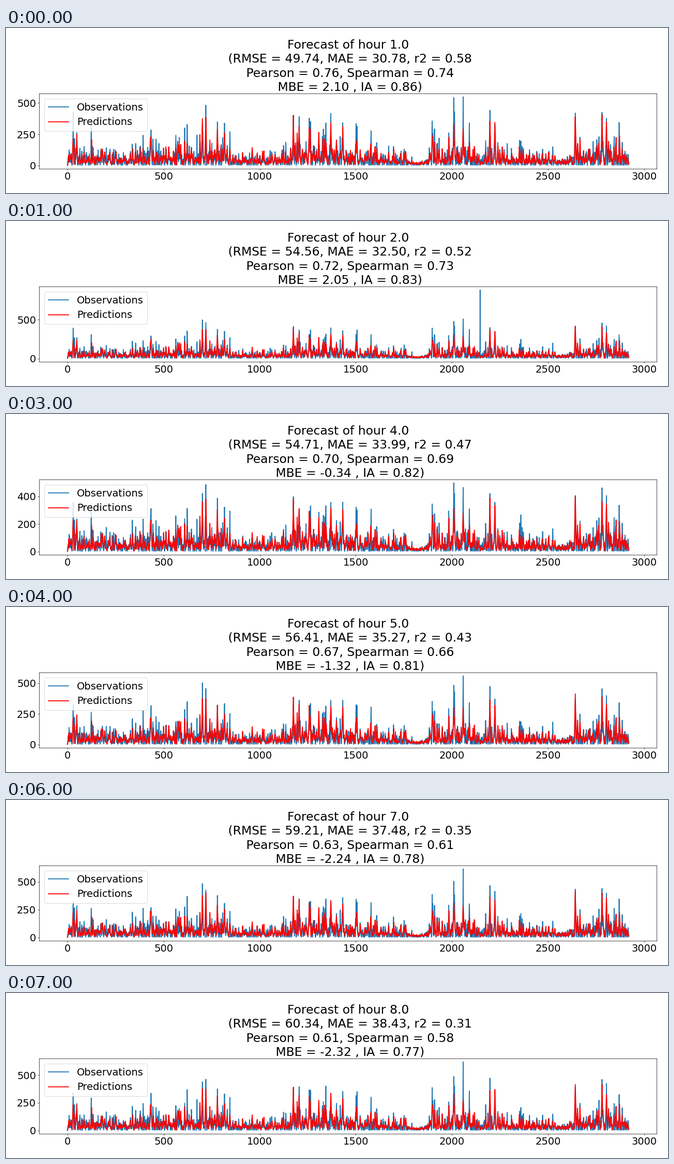
A matplotlib script for the animation above (8000 ms loop, 1280 by 320 pixels).

```python
import numpy as np
import matplotlib.pyplot as plt
from matplotlib.animation import FuncAnimation

W, H, DPI = 1280, 320, 64
LEFT, RIGHT, TOP, BOTTOM = 64.4, 1258.4, 127.0, 273.0
N = 2920
X = np.arange(N)
FLOOR = 2

plt.rcParams.update({"font.family": "DejaVu Sans", "font.size": 22})

# RMSE, MAE, r2, Pearson, Spearman, MBE, IA for each forecast hour
SCORES = [
    (49.74, 30.78, 0.58, 0.76, 0.74, 2.10, 0.86),
    (54.56, 32.50, 0.52, 0.72, 0.73, 2.05, 0.83),
    (54.53, 33.28, 0.49, 0.71, 0.71, 1.05, 0.83),
    (54.71, 33.99, 0.47, 0.70, 0.69, -0.34, 0.82),
    (56.41, 35.27, 0.43, 0.67, 0.66, -1.32, 0.81),
    (58.02, 36.52, 0.39, 0.65, 0.63, -2.13, 0.80),
    (59.21, 37.48, 0.35, 0.63, 0.61, -2.24, 0.78),
    (60.34, 38.43, 0.31, 0.61, 0.58, -2.32, 0.77),
]
# Position and height of the highest observation in each hour
RECORDS = [(2058, 548), (2146, 880), (2146, 610), (2009, 498),
           (2058, 560), (2058, 613), (2058, 615), (2058, 618)]

# Usual height of a burst along the series
ENVELOPE = [
    (0, 170), (80, 130), (330, 95), (440, 150), (700, 150), (910, 75),
    (1020, 110), (1120, 85), (1200, 165), (1450, 165), (1650, 75),
    (1740, 90), (1815, 22), (1850, 22), (1900, 140), (2070, 160),
    (2160, 70), (2310, 110), (2580, 55), (2680, 145), (2919, 140),
]
# Lasting peaks: position, forecast, observation
PEAKS = [
    (30, 225, 365), (435, 235, 300), (702, 375, 440), (720, 390, 447),
    (780, 300, 355), (817, 250, 340), (1175, 365, 367), (1205, 315, 375),
    (1258, 305, 330), (1370, 338, 350), (1432, 300, 350), (1900, 250, 280),
    (2009, 308, 480), (2058, 285, 490), (2197, 365, 435), (2223, 348, 350),
    (2641, 415, 415), (2780, 400, 445), (2803, 335, 400),
]


def bursts(xs, heights, half):
    """Upper hull of triangular peaks with the given half widths."""
    rise = np.clip(1 - np.abs(X[:, None] - xs) / half, 0, None)
    return (rise * heights).max(axis=1)


def daily(rng, low):
    """Daily cycle, eight samples a day, with a random height per day."""
    height = np.repeat(rng.uniform(low, 1, N // 8), 8)
    drift = np.cumsum(rng.normal(0, 0.15, N))
    return height * (0.5 - 0.5 * np.cos(2 * np.pi * X / 8 + drift))


rng = np.random.default_rng(12)
env = np.interp(X, *np.array(ENVELOPE).T)
peak_x, peak_pred, peak_obs = np.array(PEAKS).T

spots = np.arange(6, N, 12) + rng.integers(-5, 6, len(range(6, N, 12)))
strength = env[spots] * np.minimum(rng.lognormal(-0.15, 0.42, len(spots)), 1.6)
excess = np.minimum(rng.lognormal(0.1, 0.35, len(spots)), 1.9)

pred_base = np.maximum(0.5 * env * daily(rng, 0.2) + rng.uniform(5, 20, N),
                       bursts(spots, strength, rng.uniform(3, 7, len(spots))))
pred_base = np.maximum(pred_base, bursts(peak_x, peak_pred, 6))
obs_base = 0.75 * env * daily(rng, 0.2) * rng.lognormal(0, 0.3, N) + 3
obs_base = np.maximum(obs_base, bursts(spots + rng.integers(-2, 3, len(spots)),
                                       strength * excess, 3))
obs_base = np.maximum(obs_base, bursts(peak_x, peak_obs, 3))


def series(hour):
    rng = np.random.default_rng(hour)
    x, height = RECORDS[hour - 1]
    obs = np.clip(obs_base * rng.normal(1, 0.08, N), FLOOR, 0.99 * height)
    obs[x] = height
    pred = pred_base * rng.normal(1, 0.04, N) * np.clip(X / 8, 0, 1)
    return obs, np.clip(pred, FLOOR, 415)


def title(hour):
    rmse, mae, r2, pearson, spearman, mbe, ia = SCORES[hour - 1]
    return (f"Forecast of hour {hour:.1f}\n"
            f" (RMSE = {rmse:.2f}, MAE = {mae:.2f}, r2 = {r2:.2f}\n"
            f" Pearson = {pearson:.2f}, Spearman = {spearman:.2f}\n"
            f" MBE = {mbe:.2f} , IA = {ia:.2f})")


fig = plt.figure(figsize=(W / DPI, H / DPI), dpi=DPI, facecolor="white")
ax = fig.add_axes([LEFT / W, 1 - BOTTOM / H,
                   (RIGHT - LEFT) / W, (BOTTOM - TOP) / H])
obs_line, = ax.plot([], [], color="#1f77b4", lw=2, label="Observations")
pred_line, = ax.plot([], [], color="red", lw=2, label="Predictions")
ax.legend(loc="upper left")
heading = ax.set_title("", y=1.0, pad=5.5, linespacing=1.25)


def update(i):
    hour = i + 1
    obs, pred = series(hour)
    obs_line.set_data(X, obs)
    pred_line.set_data(X, pred)
    ax.relim()
    ax.autoscale_view()
    heading.set_text(title(hour))
    return obs_line, pred_line, heading


anim = FuncAnimation(fig, update, frames=len(SCORES), interval=1000,
                     repeat=True, repeat_delay=0, blit=False)
plt.show()
```
